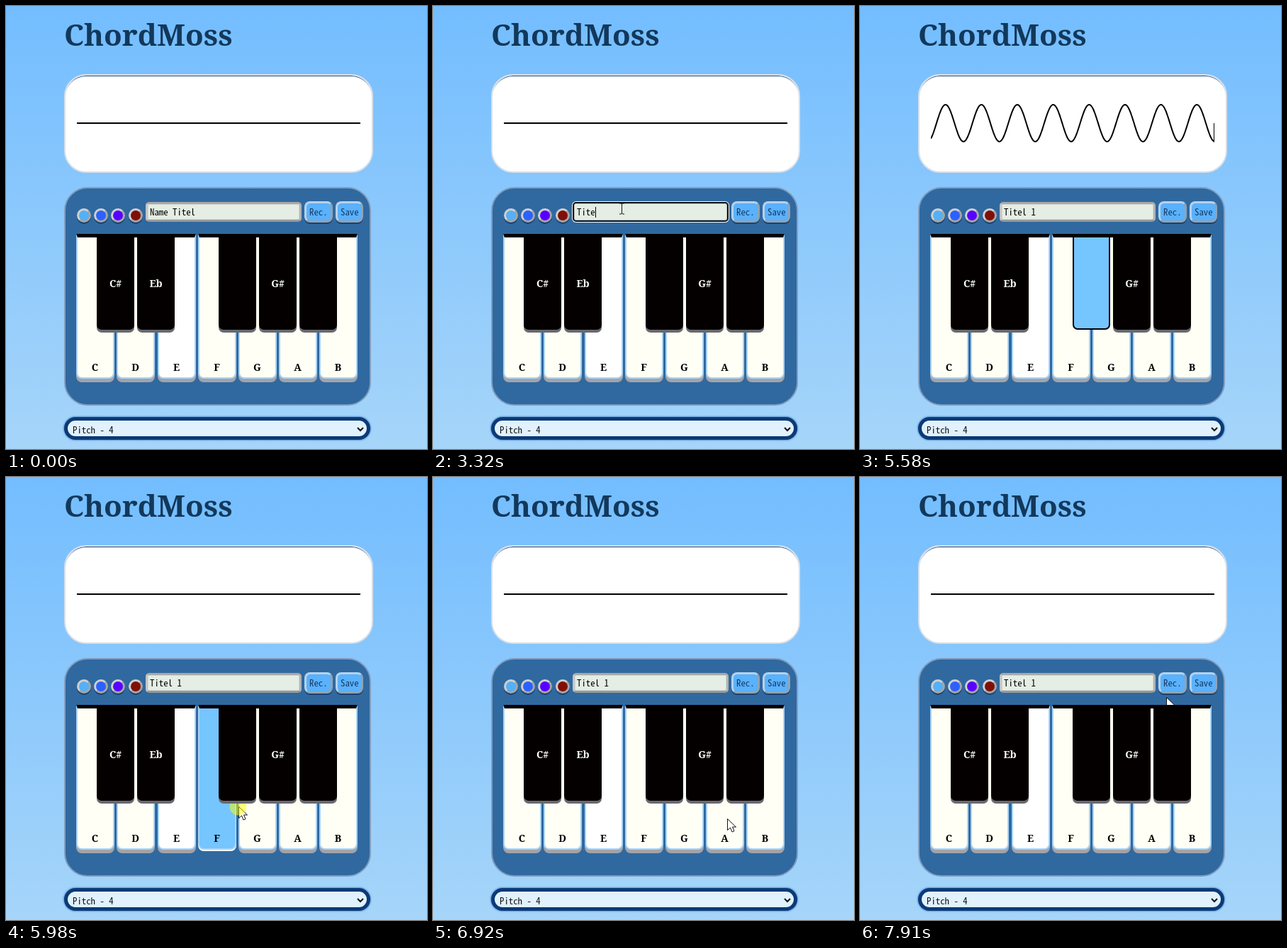
An HTML page with a canvas for the animation above (8000 ms loop, 594 by 624 pixels).

```html
<!DOCTYPE html>
<html lang="en">
<head>
<meta charset="utf-8">
<title>ChordMoss</title>
<style>
html, body { margin: 0; width: 100%; height: 100%; overflow: hidden; }
body { position: relative; background: linear-gradient(#73bdff, #a6d5f9); }
#stage { position: absolute; left: 0; top: 0; width: 594px; height: 624px; overflow: hidden; }
#stage * { position: absolute; box-sizing: border-box; }
.screen { left: 82px; top: 96px; width: 436px; height: 139px; border: 2px solid #d9dfe8; border-radius: 31px; background: #fff; box-shadow: inset 0 2px 1px -1px #1d456f; }
#wave { left: 100px; top: 130px; }
.panel { left: 82px; top: 255px; width: 433px; height: 308px; border: 2px solid #7f9dc0; border-radius: 33px; background: #30699f; }
.dot { top: 285px; width: 20px; height: 20px; border: 3px solid; border-color: #cfcfcf #a5a5a5 #a5a5a5 #cfcfcf; border-radius: 50%; box-shadow: 0 2px #173f6c; }
#field { left: 197px; top: 276px; width: 220px; height: 28px; border: 3px solid; border-color: #a8a8a8 #b2b2b2 #999 #c4c4c4; border-radius: 5px; background: #e4eee4; box-shadow: inset 0 0 0 1px #d5d8d5; }
#field.focus { border: 2px solid #0b1118; box-shadow: 0 0 0 1px #fff, inset 0 0 0 1px #b5bab5; }
.button { top: 275px; height: 30px; border: 3px solid; border-color: #b5d2ec #8fa3b5 #8fa3b5 #b5d2ec; border-radius: 8px; background: #5ab1fc; box-shadow: 0 2px #19416e; }
.white { top: 321px; width: 54px; height: 204px; border: 2px solid #a8d4f8; border-top: 5px solid #050000; border-radius: 0 0 8px 8px; background: #fffff5; box-shadow: 0 5px #a2a3aa; }
.white.down { background: #75c5ff; box-shadow: 0 2px #fff; }
.black { top: 321px; width: 53px; height: 135px; border-radius: 0 0 7px 7px; background: #050000; box-shadow: 0 4px #69696f; }
.black.down { border: 2px solid #050000; border-top-width: 5px; background: #75c5ff; box-shadow: none; }
.select { left: 82px; top: 579px; width: 432px; height: 32px; border: 5px solid #0b3a76; border-radius: 16px; background: #e1f1fd; box-shadow: 0 0 2px 1px #5b93d2; }
#ink, #pointer { left: 0; top: 0; }
#ink text { font: 12.8px "Noto Sans Mono CJK JP", "Noto Sans CJK JP", "Noto Sans CJK", monospace; white-space: pre; }
#ink .serif { font: 900 14px "Noto Serif", serif; text-anchor: middle; }
#ink .title { font: 900 42px "Noto Serif", serif; }
</style>
</head>
<body>
<div id="stage">
  <div class="screen"></div>
  <canvas id="wave" width="400" height="70"></canvas>
  <div class="panel"></div>
  <div class="dot" style="left:100px;background:#55b0f5"></div>
  <div class="dot" style="left:124px;background:#2b61ff"></div>
  <div class="dot" style="left:148px;background:#5800ff"></div>
  <div class="dot" style="left:173px;background:#800f08"></div>
  <div id="field"></div>
  <div class="button" style="left:421px;width:40px"></div>
  <div class="button" style="left:465px;width:39px"></div>
  <div id="keys"></div>
  <div class="select"></div>
  <svg id="ink" width="594" height="624">
    <text class="title" x="82" y="56" fill="#12385b">ChordMoss</text>
    <text id="entry" x="203" y="295"></text>
    <path id="caret" d="M0 283V298" stroke="#000"/>
    <text x="428" y="295" fill="#143b66">Rec.</text>
    <text x="472" y="295" fill="#143b66">Save</text>
    <text x="94" y="602" fill="#111">Pitch - 4</text>
    <path d="M496 594l4 4 4-4" fill="none" stroke="#111" stroke-width="2"/>
    <rect id="marked" x="316" y="381" width="20" height="19" fill="#0a5fd0"/>
    <g id="labels"></g>
  </svg>
  <svg id="pointer" width="594" height="624">
    <path id="arrow" d="M0 0V16L4 12.5 6.5 18.5 9.5 17.2 7 11.5H12Z" fill="#fff" stroke="#111"/>
    <path id="beam" d="M-3.5-7.5H-1L0-6.5 1-7.5H3.5M0-6.5V6.5M-3.5 7.5H-1L0 6.5 1 7.5H3.5" fill="none" stroke="#111"/>
    <circle id="glow" cx="-1" r="12" fill="#ff0" opacity=".5"/>
  </svg>
</div>
<script>
const LOOP = 8000, STEP = 66.4, STEP_ORIGIN = 5311;
const $ = id => document.getElementById(id);
const keys = {};

function addKey(name, left, kind) {
  const key = document.createElement('div');
  key.className = kind;
  key.style.left = left + 'px';
  if (name === 'E') key.style.background = '#fff';
  $('keys').append(key);
  keys[name] = key;

  const label = document.createElementNS('http://www.w3.org/2000/svg', 'text');
  const isWhite = kind === 'white';
  label.setAttribute('class', 'serif');
  label.setAttribute('x', left + 26.5);
  label.setAttribute('y', isWhite ? 513.5 : 395.5);
  label.setAttribute('fill', isWhite ? '#000' : '#fff');
  label.textContent = name;
  $('labels').append(label);
}
[...'CDEFGAB'].forEach((name, i) => addKey(name, Math.round(99.3 + i * 57.15), 'white'));
['C#', 'Eb', '', 'F#', 'G#', 'Bb'].forEach((name, i) => name && addKey(name, Math.round(128 + i * 57.2), 'black'));

// Pointer path: [time, x, y]
const path = [
  [190, 449, 561], [450, 231, 250], [590, 231, 250], [720, 266, 285],
  [4450, 266, 285], [4600, 296, 267], [4790, 318, 350], [4980, 322, 419],
  [5115, 414, 410], [5250, 330, 412], [5320, 322, 405], [5700, 322, 405],
  [5910, 328, 464], [6180, 328, 464], [6380, 463, 455], [6640, 463, 455],
  [7050, 396, 492], [7500, 396, 492], [7840, 432, 380], [7906, 432, 309]
];

// wave phase is anchored at one crest position for a given step
const notes = [
  { key: 'F#', from: 5380, to: 5680, hz: 369.99, crest: 110, step: 2 },
  { key: 'F', from: 5910, to: 6200, hz: 349.23, crest: 120, step: 12 },
  { key: 'Bb', from: 6375, to: 6640, hz: 466.16, crest: 17.5, step: 17 },
  { key: 'A', from: 7105, to: 7500, hz: 440, crest: 23, step: 30 }
];

const typing = [2790, 2990, 3120, 3320, 3520, 3650, 3920];

function pointerAt(t) {
  const next = path.findIndex(p => p[0] > t);
  if (next < 0) return path[path.length - 1].slice(1);
  const [t0, x0, y0] = path[Math.max(0, next - 1)];
  const [t1, x1, y1] = path[next];
  const u = t1 > t0 ? Math.max(0, (t - t0) / (t1 - t0)) : 0;
  const ease = u * u * (3 - 2 * u);
  return [x0 + (x1 - x0) * ease, y0 + (y1 - y0) * ease];
}

const pen = $('wave').getContext('2d');
pen.lineWidth = 2;
function drawWave(note, step) {
  pen.clearRect(0, 0, 400, 70);
  pen.beginPath();
  if (note) {
    const period = 18745 / note.hz;
    const crest = note.crest + period * 0.618 * (step - note.step);
    for (let x = 0; x <= 400; x++) {
      pen.lineTo(x, 35 - 26 * Math.cos((x - crest) / period * 2 * Math.PI));
    }
  } else {
    pen.moveTo(0, 35);
  }
  pen.lineTo(400, 35);
  pen.stroke();
}

const show = (id, on) => $(id).style.display = on ? '' : 'none';

function drawField(t) {
  const count = typing.filter(time => time <= t).length;
  const focused = t >= 920 && t < 5380;
  const blinkStart = count ? typing[count - 1] : 920;
  $('field').classList.toggle('focus', focused);
  $('entry').textContent = count ? 'Titel 1'.slice(0, count) : 'Name Titel';
  $('caret').setAttribute('transform', `translate(${Math.round(203 + count * 6.4) + 0.5} 0)`);
  show('caret', focused && Math.floor((t - blinkStart) / 530) % 2 === 0);
}

function drawPointer(t, pressed) {
  const [x, y] = pointerAt(t).map(Math.round);
  const overField = x > 197 && x < 417 && y > 276 && y < 304;
  show('arrow', t >= 190 && !overField);
  show('beam', t >= 190 && overField);
  show('glow', pressed);
  for (const id of ['arrow', 'beam', 'glow']) {
    $(id).setAttribute('transform', `translate(${x + 0.5} ${y + 0.5})`);
  }
}

function render(t) {
  const step = Math.floor((t - STEP_ORIGIN) / STEP);
  const pressed = notes.find(n => t >= n.from && t < n.to);
  const sounding = notes.find(n => t >= n.from + 75 && t < n.to + 75);
  for (const name in keys) keys[name].classList.toggle('down', !!pressed && pressed.key === name);
  for (const { key } of notes) keys[key].style.zIndex = key.length > 1 ? 1 : 0;
  show('marked', t >= 5380 && t < 6375);
  drawField(t);
  drawPointer(t < 4450 ? t : STEP_ORIGIN + step * STEP, !!pressed);
  drawWave(sounding, step);
}

const start = performance.now();
function tick() {
  render((performance.now() - start) % LOOP);
  requestAnimationFrame(tick);
}
render(0);
tick();
</script>
</body>
</html>
```
